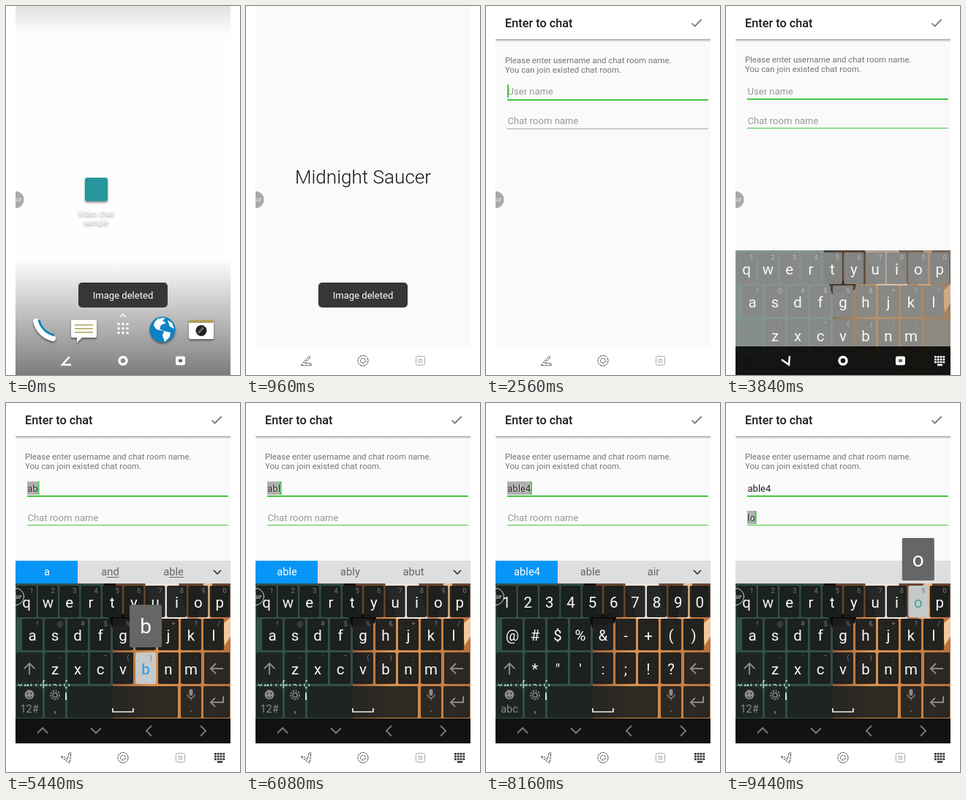
Write an HTML page with a canvas that moves like this. It is 320 px wide and 503 px high and loops after 9600 ms.

```html
<!DOCTYPE html>
<html lang="en">
<head>
<meta charset="utf-8">
<title>Video chat demo</title>
<style>
  html, body { margin: 0; width: 100%; height: 100%; overflow: hidden; background: #fff; }
  canvas { display: block; width: 320px; height: 503px; }
</style>
</head>
<body>
<canvas id="stage" width="320" height="503"></canvas>
<script>
const g = document.getElementById('stage').getContext('2d');
const LOOP = 9600, STEP = 160;
const LEFT = 13, WIDTH = 294, NAV_TOP = 464;
const GREEN = '#43c843', USER = 'able4';

// ---- drawing helpers ----
function rect(x, y, w, h, fill, r = 0) {
  g.fillStyle = fill;
  g.beginPath();
  g.roundRect(x, y, w, h, r);
  g.fill();
}
function disc(x, y, r, fill) {
  g.fillStyle = fill;
  g.beginPath();
  g.arc(x, y, r, 0, 7);
  g.fill();
}
function ring(x, y, r, color, width = 1) {
  g.strokeStyle = color;
  g.lineWidth = width;
  g.beginPath();
  g.arc(x, y, r, 0, 7);
  g.stroke();
}
function poly(points, color, width = 1, fill = false) {
  g.beginPath();
  for (let i = 0; i < points.length; i += 2) g.lineTo(points[i], points[i + 1]);
  if (fill) { g.closePath(); g.fillStyle = color; g.fill(); return; }
  g.strokeStyle = color;
  g.lineWidth = width;
  g.stroke();
}
function text(s, x, y, size, color, align = 'left', weight = 400) {
  g.font = `${weight} ${size}px Roboto, sans-serif`;
  g.textAlign = align;
  g.fillStyle = color;
  g.fillText(s, x, y);
}
function fade(alpha, draw) {
  g.save();
  g.globalAlpha *= alpha;
  draw();
  g.restore();
}
function shadowed(draw) {
  g.save();
  g.shadowColor = 'rgba(0,0,0,.45)';
  g.shadowBlur = 3;
  g.shadowOffsetY = 2;
  draw();
  g.restore();
}
function vertical(y0, y1, from, to) {
  const fill = g.createLinearGradient(0, y0, 0, y1);
  fill.addColorStop(0, from);
  fill.addColorStop(1, to);
  return fill;
}

// ---- shared pieces ----
function bubble(overKeys) {
  g.save();
  g.beginPath();
  g.rect(LEFT, 245, 40, 40);
  g.clip();
  if (overKeys) ring(13, 264, 11.5, '#d8d8d8');
  else disc(13, 264, 11.5, '#aaa9a7');
  text('GIF', 16.5, 267, 7, '#f4f4f4', 'center');
  g.restore();
}
function navSolid(keyboard) {
  const back = keyboard ? [76, 482, 86, 489, 87, 477] : [87, 478, 77, 489, 89, 489];
  poly(back, '#fff', 2.5);
  ring(160, 483.5, 5, '#fff', 3.5);
  rect(232, 477.5, 13, 12, '#fff', 2);
  rect(236, 481.5, 5, 4, '#666');
  if (keyboard) keyboardIcon('#fff');
}
function keyboardIcon(color) {
  for (let r = 0; r < 3; r++)
    for (let c = 0; c < 4; c++) rect(285 + c * 3.8, 477 + r * 3.6, 2.8, 2.6, color);
  rect(289, 488, 7, 2.5, color);
}
function navOutline(keyboard) {
  rect(0, NAV_TOP, 320, 39, '#fff');
  const dark = '#333';
  g.setLineDash([3, 1]);
  poly(keyboard ? [75, 482, 79, 482, 84, 486, 86, 477, 89, 477, 87, 491, 75, 482]
                : [75, 490, 86, 477.5, 88, 479, 80, 487, 89, 487, 89, 490, 75, 490], dark);
  ring(160, 483.5, 7, dark);
  ring(160, 483.5, 3.3, dark);
  g.setLineDash([]);
  g.strokeStyle = '#aaa';
  g.beginPath();
  g.roundRect(232.5, 477.5, 12, 12, 2);
  g.rect(236.5, 481.5, 4, 4);
  g.stroke();
  if (keyboard) keyboardIcon('#333');
}
function toast(alpha) {
  if (alpha <= 0) return;
  fade(alpha, () => {
    rect(99, 377, 122, 34, '#363636', 5);
    text('Image deleted', 160, 399, 13.07, '#fff', 'center');
  });
}

// ---- home screen ----
function home(pressed) {
  rect(LEFT, 0, WIDTH, 503, '#fefefe');
  rect(LEFT, 0, WIDTH, 40, vertical(0, 40, '#e1e1e1', '#fefefe'));
  rect(LEFT, 345, WIDTH, 158, vertical(345, 503, '#fefefe', '#7c7c7c'));
  fade(pressed ? 0.75 : 1, () => {
    shadowed(() => {
      rect(108, 234, 31, 32, '#26969c', 3);
      text('Video chat', 123, 286, 10.5, '#fff', 'center');
      text('sample', 123, 298, 10.5, '#fff', 'center');
    });
    dock();
  });
  bubble(false);
  navSolid(false);
  toast(1);
}
function dock() {
  shadowed(() => {
    // handset
    g.lineCap = 'round';
    g.strokeStyle = '#fff';
    g.lineWidth = 8;
    g.beginPath();
    g.moveTo(41, 430);
    g.quadraticCurveTo(46, 448, 64, 453);
    g.stroke();
    g.lineCap = 'butt';
    // message
    rect(89, 428, 35, 24, '#fff', 2);
    poly([97, 451, 97, 459, 105, 451], '#fff', 1, true);
    // globe
    disc(214, 441, 17.5, '#0c83c4');
    // camera
    rect(250, 428, 34, 26, '#fff', 2);
  });
  // blue inner curve of the handset
  g.strokeStyle = '#0c83c4';
  g.lineWidth = 3;
  g.beginPath();
  g.moveTo(45, 428);
  g.quadraticCurveTo(49, 444, 66, 449);
  g.stroke();
  for (let i = 0; i < 3; i++) rect(94, 434 + i * 5, 25, 1.5, '#b1a15e');
  poly([203, 431, 208, 426, 218, 425, 214, 429, 219, 432, 212, 435, 210, 440, 216, 443, 206, 441, 202, 436], '#fff', 1, true);
  poly([216, 443, 225, 445, 224, 451, 217, 458, 214, 449], '#fff', 1, true);
  poly([221, 428, 227, 432, 230, 440, 224, 437], '#fff', 1, true);
  rect(250, 428, 34, 4, '#b1a15e', 1);
  disc(267, 442.5, 7.5, '#222');
  poly([263, 446, 270, 438], '#666', 3);
  poly([156, 424, 160, 420, 164, 424], '#fff', 1.3);
  for (let i = 0; i < 9; i++)
    rect(152.5 + (i % 3) * 6, 432 + Math.floor(i / 3) * 6, 3, 3, '#fff');
}

// ---- splash ----
function splash(textAlpha, toastAlpha) {
  rect(LEFT, 0, WIDTH, NAV_TOP, '#fafafa');
  fade(textAlpha, () => text('Midnight Saucer', 160, 242, 26.1, '#151515', 'center', 300));
  bubble(false);
  toast(toastAlpha);
  navOutline(false);
}

// ---- form ----
function field(y, value, hint, composing, cursor) {
  const size = 13.07;
  if (!value) text(hint, 29.5, y - 6, size, '#9a9a9a');
  else if (!composing) text(value, 29.5, y - 6, size, '#222');
  g.font = `400 ${size}px Roboto, sans-serif`;
  const end = 29.5 + g.measureText(value).width;
  if (value && composing) {
    rect(29, y - 20, end - 29, 18, '#b0b0b0');
    text(value, 30.5, y - 6, size, '#fff');
    text(value, 29.5, y - 6, size, '#222');
  }
  if (cursor) rect(end - 0.5, y - 20, 2, 18, GREEN);
}
function form(s) {
  const lift = s.early ? 0 : 0.7;
  rect(LEFT, 0, WIDTH, NAV_TOP, '#fafafa');
  rect(LEFT, 45, WIDTH, 4, vertical(45, 49, '#a8a8a8', '#fafafa'));
  rect(LEFT, 0, WIDTH, 45, '#fff');
  text('Enter to chat', 26, 29, 16.3, '#1c1c1c', 'left', 500);
  poly([281, 24.1, 285.5, 28.7, 295.3, 18.9, 294.2, 17.8, 285.5, 26.4, 282.1, 23], '#6c6c6c', 1, true);
  text('Please enter username and chat room name.', 26, 78 - lift, 11.43, '#757575');
  text('You can join existed chat room.', 26, 91 - lift, 11.43, '#757575');
  field(127, s.user, 'User name', s.composing === 1, s.cursor === 1);
  field(167, s.room, 'Chat room name', s.composing === 2, s.cursor === 2);
  if (s.early) {
    rect(29, 127, 275, 2, GREEN);
    rect(29, 167, 275, 1, '#a5a5a5');
  } else {
    rect(29, 126, 275, 2, GREEN);
    rect(29, 166, 275, 1, GREEN);
  }
}

// ---- keyboard ----
const LETTERS = ['qwertyuiop', 'asdfghjkl', 'zxcvbnm'];
const HINTS = ['1234567890', '!@#$%&+?/', '-\'"();:'];
const SYMBOLS = ['1234567890', '@#$%&-+()', '*"\':;!?'];
const ROWS = [
  { y: 249, x: 28, pitch: 29.35, w: 27 },
  { y: 294, x: 36, pitch: 31, w: 28 },
  { y: 340, x: 67, pitch: 31, w: 28 }
];
const KEY_H = 43, DIM = '#8a8a8a';

function wallpaper() {
  rect(LEFT, 246, WIDTH, 185, '#314e47');
  const warm = g.createLinearGradient(140, 0, 307, 0);
  warm.addColorStop(0, '#8a5630');
  warm.addColorStop(0.35, '#dd924f');
  warm.addColorStop(1, '#b8713a');
  rect(146, 280, 161, 151, warm);
  rect(134, 246, 100, 46, '#17110d');
  rect(150, 246, 157, 46, '#6b4630');
  poly([190, 246, 236, 246, 248, 294, 206, 294], '#f1e5da', 1, true);
  poly([270, 246, 282, 246, 280, 294, 262, 294], '#e7b98d', 1, true);
  poly([140, 290, 180, 285, 176, 300, 145, 306], '#0e0b09', 1, true);
  poly([296, 302, 307, 292, 307, 318, 299, 331], '#f2c79c', 1, true);
  text('VALORISTO', 15, 389, 14, '#c4e6da');
  rect(81, 395, 2, 10, '#c4e6da');
}
function press(x, y, label, w = 44) {
  rect(x - w / 2, y - 65, w, 58, '#666', 2);
  text(label, x, y - 26, w > 44 ? 24 : 28, '#fff', 'center');
}
function sideIcons(symbols) {
  poly([32, 370, 32, 355], DIM, 2);
  poly([25, 362, 32, 355, 39, 362], DIM, 2);
  poly([297, 362, 280, 362], DIM, 2);
  poly([287, 355, 280, 362, 287, 369], DIM, 2);
  poly([297, 400, 297, 408, 280, 408], DIM, 2);
  poly([286, 402, 280, 408, 286, 414], DIM, 2);
  disc(32, 397.5, 6.5, DIM);
  disc(29.5, 396, 1, '#222');
  disc(34.5, 396, 1, '#222');
  poly([29, 400, 32, 402, 35, 400], '#222');
  text(symbols ? 'abc' : '12#', 32, 422, 14.5, DIM, 'center');
  g.setLineDash([2.5, 1.5]);
  ring(67, 398, 6, DIM, 1.7);
  g.setLineDash([]);
  ring(67, 398, 3, DIM, 1.5);
  text(',', 67, 422, 16, DIM, 'center');
  rect(250.5, 390, 5, 9, DIM, 2.5);
  g.strokeStyle = DIM;
  g.lineWidth = 1.3;
  g.beginPath();
  g.arc(253, 397, 5, 0, Math.PI);
  g.moveTo(253, 402);
  g.lineTo(253, 405);
  g.stroke();
  text('.', 253, 421, 16, DIM, 'center');
  poly([146, 416, 146, 421, 174, 421, 174, 416], '#eee', 1.7);
}
function suggestions(words, typed) {
  rect(LEFT, 215, WIDTH, 31, '#dedede');
  if (!words) return;
  rect(LEFT, 215, 85, 31, '#0795f8');
  [56, 142.5, 229].forEach((x, i) => {
    const word = words[i];
    text(word, x, 235, 14.7, i ? '#666' : '#fff', 'center');
    if (i && typed) {
      const full = g.measureText(word).width, skip = g.measureText(word[0]).width;
      rect(x - full / 2 + skip, 237, full - skip, 1, '#666');
    }
  });
  poly([284, 228, 289, 233, 294, 228], '#222', 1.5);
}
function keyboard(s) {
  g.save();
  g.fontStretch = 'condensed';
  const keyFill = s.rising ? 'rgba(134,136,135,.95)' : 'rgba(27,30,30,.95)';
  const sideFill = s.rising ? 'rgba(134,140,138,.8)' : 'rgba(28,32,32,.9)';
  fade(s.rising ? 0.58 : 1, wallpaper);
  const chars = s.symbols ? SYMBOLS : LETTERS;
  let popup;
  ROWS.forEach((row, r) => [...chars[r]].forEach((ch, i) => {
    const x = row.x + i * row.pitch, lit = ch === s.key;
    rect(x - row.w / 2, row.y, row.w, KEY_H, lit ? '#c5c9ca' : keyFill, 2);
    if (!s.symbols)
      text(HINTS[r][i], x + 7, row.y + 10, 9, lit ? '#777' : s.rising ? '#bbb' : '#7c7c7c', 'center');
    text(ch, x, row.y + 30, 20.5, lit ? (r ? '#209be0' : '#4aa097') : '#f8f8f8', 'center');
    if (lit) popup = () => press(x, row.y, ch);
  }));
  for (const [x, y, w] of [[14, 340, 36], [271, 340, 35], [14, 386, 36], [53, 386, 28], [84, 386, 151], [239, 386, 28], [270, 386, 36]])
    rect(x, y, w, KEY_H, sideFill, 2);
  fade(s.rising ? 0.6 : 1, () => sideIcons(s.symbols));
  rect(LEFT, 430, WIDTH, 34, '#101214');
  poly([43, 450, 50, 443, 57, 450], '#777', 2);
  poly([116, 443, 123, 450, 130, 443], '#777', 2);
  poly([199, 440, 192, 447, 199, 454], '#777', 2);
  poly([266, 440, 273, 447, 266, 454], '#777', 2);
  if (s.key === '12#') press(43.5, 387, '12#', 53);
  else if (popup) popup();
  g.restore();
}

// Each entry takes effect at its time and keeps the values set before it.
const SCRIPT = [
  [2400, { user: '', room: '', cursor: 1, early: true }],
  [3200, { cursor: 0 }],
  [3360, { cursor: 1 }],
  [3840, { early: false, cursor: 0, rising: true }],
  [4000, { rising: false, keys: 0.9 }],
  [4320, { keys: 1 }],
  [4960, { user: 'a', key: 'a', composing: 1, cursor: 1 }],
  [5280, { key: '', words: ['a', 'and', 'able'], typed: true }],
  [5440, { user: 'ab', key: 'b' }],
  [5760, { key: '', words: ['ab', 'able', 'about'], typed: false }],
  [5920, { user: 'abl', key: 'l' }],
  [6080, { key: '', words: ['able', 'ably', 'abut'] }],
  [6240, { user: 'able', key: 'e' }],
  [6560, { key: '', words: ['able', 'air', 'abut'] }],
  [6880, { key: '12#' }],
  [7040, { key: '', symbols: true }],
  [7520, { cursor: 0 }],
  [8000, { user: USER, key: '4', cursor: 1 }],
  [8160, { key: '', words: [USER, 'able', 'air'] }],
  [8480, { composing: 0, cursor: 2, symbols: false, words: null }],
  [9280, { room: 'l', key: 'l', composing: 2 }],
  [9440, { room: 'lo', key: 'o' }]
];
function chat(t) {
  const s = Object.assign({}, ...SCRIPT.filter(([at]) => at <= t).map(([, change]) => change));
  form(s);
  if (s.rising) {
    g.save();
    g.translate(0, 87);
    keyboard(s);
    g.restore();
    rect(LEFT, NAV_TOP, WIDTH, 39, 'rgba(0,0,0,.86)');
    bubble(false);
    navSolid(true);
  } else {
    if (s.keys) fade(s.keys, () => {
      suggestions(s.words, s.typed);
      keyboard(s);
    });
    bubble(s.keys);
    navOutline(s.keys);
  }
}

function draw(t) {
  rect(0, 0, 320, 503, '#fff');
  if (t < 640) home(t >= 320);
  else if (t < 2400) splash(t < 960 ? 0.6 : 1, 1 - Math.max(0, t - 960) / 800);
  else if (t < 2560) {
    splash(1, 0);
    fade(0.6, () => chat(t));
  } else chat(t);
}
function tick() {
  const t = performance.now() % LOOP;
  draw(Math.floor(t / STEP) * STEP);
  requestAnimationFrame(tick);
}
tick();
</script>
</body>
</html>
```
